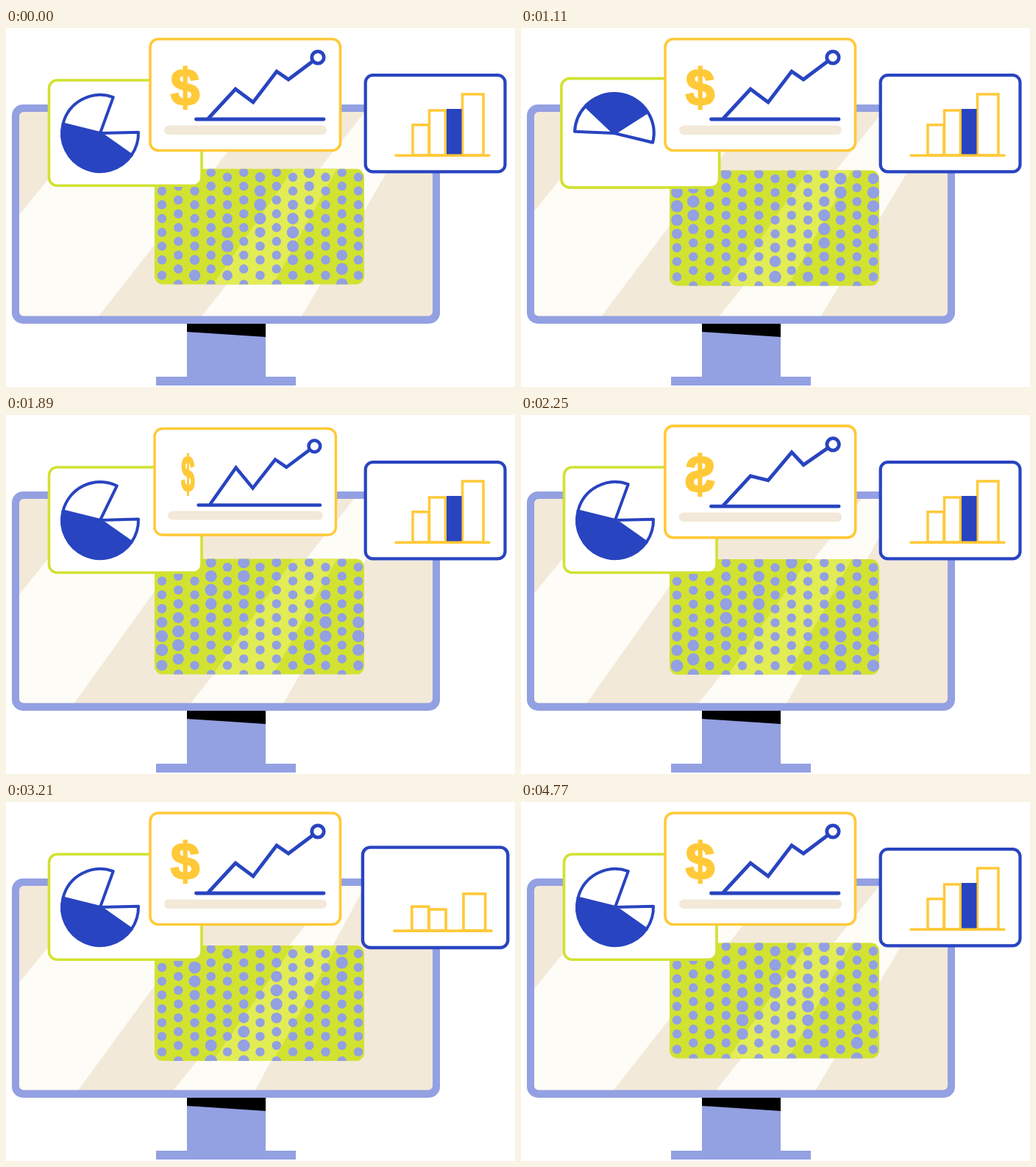
Write an HTML page that moves like this. It is 692x488 px and loops after 4800 ms.

```html
<!DOCTYPE html>
<html lang="en">
<head>
<meta charset="utf-8">
<title>Dashboard</title>
<style>
html, body { margin: 0; width: 100%; height: 100%; overflow: hidden; background: #fff; }
svg { display: block; width: 692px; height: 488px; }
</style>
</head>
<body>
<svg viewBox="0 0 692 488" xmlns="http://www.w3.org/2000/svg">
  <defs>
    <clipPath id="screenClip"><rect x="18" y="114" width="562" height="277.5" rx="6"/></clipPath>
    <clipPath id="panelClip"><rect x="202" y="191.5" width="285" height="157" rx="11"/></clipPath>
  </defs>

  <g fill="#93a0e2">
    <rect x="246" y="400" width="107" height="76"/>
    <rect x="204" y="474" width="190" height="12"/>
    <rect x="8" y="104" width="582" height="298" rx="15"/>
  </g>
  <path d="M246 402H353V420L246 413Z"/>
  <g clip-path="url(#screenClip)">
    <rect x="18" y="114" width="562" height="278" fill="#f3e9d9"/>
    <path id="stripeA" fill="#fdfcf7"/>
    <path id="stripeB" fill="#fdfcf7"/>
  </g>

  <g id="panel">
    <g clip-path="url(#panelClip)">
      <rect x="202" y="191" width="285" height="158" fill="#d1e231"/>
      <path d="M281 349L391 191H450L363 349Z" fill="#e2ec54"/>
      <g id="dots" fill="#93a0e2"></g>
    </g>
  </g>

  <g id="pieCard">
    <rect x="58.5" y="71" width="207.5" height="143.3" rx="11" fill="#fff" stroke="#d1e231" stroke-width="3.6"/>
    <g stroke="#2844c0" stroke-width="4" stroke-linejoin="round">
      <path id="sliceA" fill="#fff"/>
      <path id="sliceB" fill="#fff"/>
      <path id="sliceMain" fill="#2844c0" stroke-width="1.5"/>
    </g>
  </g>

  <g id="lineCard">
    <rect x="196" y="15" width="258.5" height="151.5" rx="11" fill="#fff" stroke="#ffc938" stroke-width="3.6"/>
    <rect x="215" y="132.5" width="221" height="12.5" rx="6.2" fill="#f3e9d9"/>
    <g id="dollar">
      <text y="105" text-anchor="middle" font-family="'Liberation Sans', Arial, sans-serif" font-weight="700" font-size="71" fill="#ffc938" stroke="#ffc938" stroke-width="2.4">$</text>
    </g>
    <g fill="none" stroke="#2844c0" stroke-width="4.8">
      <path id="trend"/>
      <path d="M258.5 124H432" stroke-linecap="round"/>
      <circle id="ring" cx="424" r="8.2" fill="#fff"/>
    </g>
  </g>

  <g id="barCard">
    <rect x="488.7" y="64.2" width="189.8" height="131.2" rx="10" fill="#fff" stroke="#2844c0" stroke-width="4.2"/>
    <g id="bars" fill="#fff" stroke="#ffc938" stroke-width="3.5"></g>
    <path d="M530 173.3H657" stroke="#ffc938" stroke-width="3.6" stroke-linecap="round"/>
  </g>
</svg>

<script>
const LOOP = 4800;
const $ = id => document.getElementById(id);
const set = (el, attrs) => { for (const k in attrs) el.setAttribute(k, attrs[k]); };
const ease = p => (1 - Math.cos(Math.PI * p)) / 2;
const bump = x => Math.abs(x) < 1 ? Math.cos(x * Math.PI / 2) ** 2 : 0;

// Keys are [time, value] pairs, eased between neighbours
function track(t, keys) {
  if (t <= keys[0][0]) return keys[0][1];
  for (let i = 1; i < keys.length; i++) {
    const [t0, a] = keys[i - 1], [t1, b] = keys[i];
    if (t < t1) return a + (b - a) * ease((t - t0) / (t1 - t0));
  }
  return keys[keys.length - 1][1];
}

function add(parent, tag, attrs) {
  const el = document.createElementNS('http://www.w3.org/2000/svg', tag);
  set(el, attrs);
  parent.appendChild(el);
  return el;
}

// Times at which the pulse of each dot column passes mid-panel
const pulseTimes = [1410, 1500, 3730, 2300, 4450, 2560, 290, 3300, 4660, 1110, 1730, 3960, 1540];
const dots = [];
pulseTimes.forEach((peak, col) => {
  const odd = col % 2, rows = odd ? 9 : 8;
  for (let row = 0; row < rows; row++) {
    const y = 191.5 + (odd ? 4.8 : 11.3) + 18.75 * row + (row === rows - 1 ? 2.2 : 0);
    dots.push({ peak, y, el: add($('dots'), 'circle', { cx: 212 + 22.25 * col, cy: y }) });
  }
});

const bars = [
  { x: 553, w: 22, top: 131.7, start: 2380 },
  { x: 575.5, w: 22, top: 112, start: 2516 },
  { x: 620.5, w: 28.5, top: 90, start: 3040 },
  { x: 599, w: 20.5, top: 110, start: 2840, solid: true }
];
for (const b of bars) {
  b.el = add($('bars'), 'rect', { x: b.x, width: b.w });
  if (b.solid) set(b.el, { fill: '#2844c0', stroke: 'none' });
}

// x, y and time of the upward hop
const trendPoints = [
  [275, 123, -9999], [312, 83, 1870], [336, 101, 2210],
  [368, 59, 2410], [384, 70, 2540], [424, 40, 2680]
];

function scaleCard(id, cx, cy, s) {
  set($(id), { transform: `translate(${cx} ${cy}) scale(${s}) translate(${-cx} ${-cy})` });
}

function slice(id, from, sweep, r) {
  const pt = deg => {
    const a = deg * Math.PI / 180;
    return `${128 + r * Math.cos(a)} ${143 + r * Math.sin(a)}`;
  };
  set($(id), { d: `M128 143L${pt(from)}A${r} ${r} 0 ${sweep > 180 ? 1 : 0} 1 ${pt(from + sweep)}Z` });
}

function drawScreen(t) {
  const q = ease(t / 2400);
  const y = 254 - 11.5 * q;
  set($('stripeA'), { d: `M18 ${y}L${18 + (y - 114) / 1.23} 114H${344 - 58 * q}L${126 - 37 * q} 391.5H18Z` });
  const p = track(t < 600 ? t + LOOP : t, [[600, 1], [3200, 0], [5400, 1]]);
  const left = 228 + 46 * p;
  set($('stripeB'), { d: `M${left} 391.5L${left + 222} 114H${488 + 95 * p}L${339 + 76 * p} 391.5Z` });
}

function drawPanel(t) {
  set($('panel'), { transform: `translate(0 ${4.6 * ease(t / 2400)})` });
  for (const d of dots) {
    let dt = t - d.peak;
    dt -= LOOP * Math.round(dt / LOOP);
    const center = 267 + dt * 0.085;
    set(d.el, { r: 6.2 + 2.1 * bump((d.y - center) / 64) });
  }
}

function drawPie(t) {
  scaleCard('pieCard', 162.2, 142.6, track(t, [[300, 1], [540, 0.953], [1350, 1.055], [1700, 1]]));
  const dip = bump((t - 1090) / 800);
  const over = 6 * bump((t - 1890) / 260);
  const a = 36.5 + 4.5 * dip, main = 159 - 55 * dip, b = 96 - 50 * dip + over;
  const start = -1.5 + track(t, [[300, 0], [1900, 360]]);
  slice('sliceA', start, a, 52);
  slice('sliceMain', start + a, main, 53.3);
  slice('sliceB', start + a + main, b, 52);
}

function drawTrend(t) {
  scaleCard('lineCard', 325, 90.6, track(t, [[1650, 1], [1890, 0.953], [2640, 1.056], [2980, 1]]));
  const turn = Math.min(1, Math.max(0, (t - 1710) / 1080));
  set($('dollar'), { transform: `translate(243.5 0) scale(${Math.cos(turn * 2 * Math.PI)} 1)` });
  const pts = trendPoints.map(([x, y, peak]) => [x, y - 12.5 * bump((t - peak) / 400)]);
  set($('trend'), { d: 'M' + pts.map(p => p.join(' ')).join('L') });
  set($('ring'), { cy: pts[5][1] });
}

function drawBars(t) {
  scaleCard('barCard', 583.6, 129.8, track(t, [[2400, 1], [2640, 0.953], [3300, 1.044], [3750, 1]]));
  for (const b of bars) {
    const k = track(t, [[b.start, 1], [b.start + 380, 0], [b.start + 1050, 1]]);
    const h = (173 - b.top) * k;
    set(b.el, { y: 173 - h, height: h });
  }
}

function draw(t) {
  drawScreen(t);
  drawPanel(t);
  drawPie(t);
  drawTrend(t);
  drawBars(t);
}

const began = performance.now();
function tick() {
  draw((performance.now() - began) % LOOP);
  requestAnimationFrame(tick);
}
draw(0);
requestAnimationFrame(tick);
</script>
</body>
</html>
```
